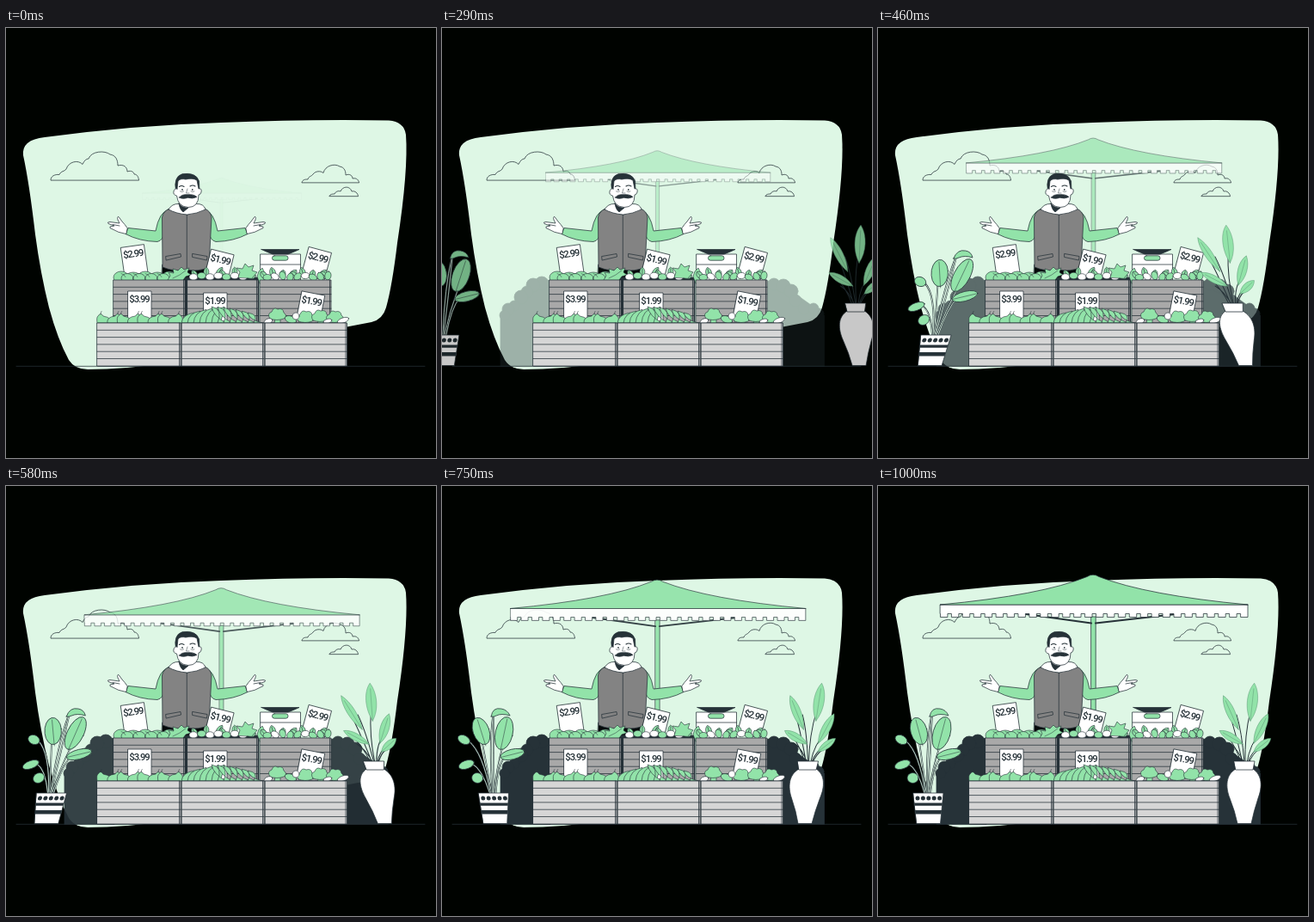
Animation of 500x500 px, one loop 1.04 s. Source, as an HTML page:

```html
<!DOCTYPE html>
<html lang="en">
<head>
<meta charset="utf-8">
<title>Market stall</title>
<style>
  html, body { margin: 0; width: 100%; height: 100%; overflow: hidden; background: #000300; }
  svg { display: block; width: 100vw; height: 100vh; }
  text { font: 500 11.3px Roboto, "Liberation Sans", sans-serif; letter-spacing: -1.1px; fill: #263238; stroke: none; }
</style>
</head>
<body>
<svg id="stage" viewBox="0 0 500 500"></svg>
<script>
const INK = '#263238', GREEN = '#92e3a9', MINT = '#def7e5', WHITE = '#fff';

const path = (d, fill = 'none', extra = '') => `<path d="${d}" fill="${fill}" ${extra}/>`;
const rect = (x, y, w, h, fill, extra = '') =>
  `<rect x="${x}" y="${y}" width="${w}" height="${h}" fill="${fill}" ${extra}/>`;
const oval = (x, y, rx, ry, turn = 0, fill = GREEN, extra = '') =>
  `<ellipse cx="${x}" cy="${y}" rx="${rx}" ry="${ry}" fill="${fill}" transform="rotate(${turn} ${x} ${y})" ${extra}/>`;
const group = (body, extra = '') => `<g ${extra}>${body}</g>`;
const range = (n, make) => Array.from({ length: n }, (_, i) => make(i)).join('');
const NO_LINE = 'stroke="none"', THIN = 'stroke-width=".5"';

// Pointed leaf with a midrib, growing from (x, y)
const leaf = (x, y, len, wide, turn) => group(
  path(`M0 0C${-wide} ${-len * .3} ${-wide} ${-len * .75} 0 ${-len}C${wide} ${-len * .75} ${wide} ${-len * .3} 0 0Z`, GREEN) +
  path(`M0 0V${-len * .85}`), `transform="translate(${x} ${y}) rotate(${turn})"`);

const sign = (x, y, turn, price, h = 33) => group(
  rect(-13.5, 0, 27, h, WHITE) + `<text x="-.5" y="13" text-anchor="middle">${price}</text>`,
  `transform="translate(${x} ${y}) rotate(${turn})"`);

const crate = (x, y, w, fill) =>
  rect(x, y, w, 50, fill) +
  range(5, i => path(`M${x} ${y + 8.3 * (i + 1)}h${w}`)) +
  path(`M${x + w - 1.5} ${y}v50`);

function scenery() {
  const blob = path('M20 148Q18 130 45 127Q150 113 250 110Q350 106 445 107.5Q463 109 465 124Q468 165 455 250' +
    'Q449 300 442 325Q438 339 425 342L300 366Q230 380 180 390Q140 397 95 397Q80 397 73 386Q60 362 50 325' +
    'Q40 285 34 240Q27 180 20 148Z', MINT, NO_LINE);
  const clouds = path('M52 176.7C52 172 57 170 62 170.5C64 166 68 167 70 164C73 155 84 153 89 158.5Q92 152 96 152' +
    'C99 143 115 142 121 147C128 148 130 154 130 160C137 158 141 162 141 167C146 165 149 168 149 170C153 170 154 174 154.5 176.7Z') +
    path('M344 179.5C345 176 348 176 351 176C352 172 355 173 357 170C360 166 366 166 369 168.5C371 160 382 157 388 161' +
      'C394 162 395 167 395 171C400 169 403 172 403 175C408 174 410 177 410.5 179.5Z') +
    path('M376 195.3C377 193 380 193 382 193C383 190 387 189 389 190C391 184 400 183 402 190C406 189 409 192 409.5 195.3Z');
  return blob + path('M12 393.3H487') + clouds;
}

function bush() {
  const puffs = [[116, 297, 8], [106, 299, 8], [99, 307, 7], [92, 313, 8], [84, 323, 6], [77, 327, 7], [73, 334, 6],
    [386, 298, 7], [397, 300, 8], [406, 306, 8], [411, 317, 7], [421, 326, 7], [432, 326, 6], [438, 332, 6]];
  return path('M68 393V334L80 324L92 309L106 296L126 293V393Z', INK) +
    path('M376 393V294L400 296L412 310L436 327L444.5 334V393Z', INK) +
    puffs.map(([x, y, r]) => oval(x, y, r, r, 0, INK)).join('');
}

function umbrella() {
  const step = 12.93;
  let hem = 'M72.5 138H430V152';
  for (let i = 27; i >= 0; i--) {
    const x = 72.5 + i * step;
    hem += `H${x + 8.4}V152.5H${x}V148.5H${x - (i ? step - 8.4 : 0)}`;
  }
  return rect(248, 152, 5.2, 241, GREEN) +
    path('M172 149L248 159.5M253 159.5L346 149', 'none', 'stroke-width="2"') +
    path(hem + 'Z', WHITE) +
    path('M72.5 138Q190 127 243 105.5Q250 101 257 105.5Q312 127 430 138Z', GREEN);
}

function arm() {
  return path('M189 211Q178 214 174 236L142 232.5L139 239.5Q155 248 176 248.5Q183 247 184 237Z', GREEN) +
    path('M141 232.5Q138 228 135 225L131 219.5Q129 219 130 223L132 227L121 225.5Q117 225.5 119 227.5L126 230' +
      'L121 231Q120 233 123 233.5Q130 238 139.5 239.5Z', WHITE) + path('M124 228.5L132 230');
}

function seller() {
  const head = path('M197.5 189Q194.5 173 205 169.7Q221 167.5 224.5 178L225 189Z', INK) +
    path('M199 187L200 178Q203 174.5 209 176Q217 174 222 177L224 187Q228 186 227 191Q226 194 224 194' +
      'Q224 208.5 212 208.5Q200 208 198.5 195Q194 194 195 190Q196 186 199 187Z', WHITE) +
    path('M201.5 184.5Q204 182.5 207 184.5M214 184Q217 182 220 184', 'none', 'stroke-width="1.1"') +
    oval(205, 188, .8, .9, 0, INK, NO_LINE) + oval(216.8, 188, .8, .9, 0, INK, NO_LINE) +
    path('M202.5 190q2 1.2 4 0M215 190q2 1.2 4 0', 'none', THIN) +
    path('M211 187L209.5 192H213', 'none', THIN) +
    path('M201.5 197Q205 193 211 193.8Q218 193 222 196.5Q217 199 211.5 197.3Q205 199.5 201.5 197Z', INK);
  return path('M182 275H236V293H181Z', '#060a0a') + arm() + group(arm(), 'transform="matrix(-1 0 0 1 420 0)"') +
    path('M190 210Q183 213 181.5 220L182 278Q196 284 210 281Q224 284 236 278L239 220Q238 213 231 210L211 217Z', '#838383') +
    path('M210.3 216V282') +
    path('M186 265.5L203 262.5L203.5 266L186.5 270ZM217 262.5L234 265.5L233.5 270L217 266.5Z') +
    path('M189 211Q193 204 201 204.5H221Q230 204 232 211Q222 216 210.5 217Q198 216 189 211Z', WHITE) +
    path('M201 204Q204 209 212 209L206 214Q202 211 201 204Z', INK) + head;
}

function scales() {
  return rect(296, 263, 46.5, 30, WHITE) + path('M296 275H342.5') +
    rect(309.5, 264.8, 18.5, 5.4, GREEN, 'rx="2.6"') +
    path('M297 257.5H341Q333 261 328 263H310Q305 261 297 257.5Z', INK);
}

function topProduce() {
  const melons = range(5, i => oval(134 + i * 14, 290, 9, 7 - i % 2, 0)) +
    range(4, i => oval(141 + i * 14, 291, 7, 5.5, 0)) +
    range(5, i => path(`M${134 + i * 14} 285.5q4 1 5 4`, 'none', THIN));
  const lettuce = path('M188 293L191 288L189 284L195 285L194 280L200 282L204 278L207 281L213 279L211 284L215 287L209 289L206 293Z', GREEN) +
    path('M194 291Q202 288 209 282', 'none', THIN);
  const turnips = range(6, i => leaf(222 + i * 11, 290, 10 + i % 3 * 2, 4, -35 + i % 3 * 34)) +
    range(8, i => oval(218 + i * 9.6, 289.5 - i % 2 * 1.5, 5, 3.8, 0, i % 3 === 1 ? GREEN : WHITE)) +
    path('M270 290L272 284L268 279L275 280L278 274L282 278L288 276L286 282L292 284L286 291Z', GREEN) +
    path('M295 297L292 289L294 283L298 279L301 285L299 291L302 296Z', GREEN);
  const sprouts = range(9, i => leaf(303 + i * 8.7, 291, 10 + i % 2 * 3, 4.5, -42 + i % 4 * 28)) +
    range(9, i => oval(304 + i * 8.8, 290 - i % 3, 5, 3.6, i * 35, i % 4 === 1 ? WHITE : GREEN));
  return melons + lettuce + turnips + sprouts;
}

function lowProduce() {
  const pears = range(8, i => {
    const x = 114 + i * 11.8, lean = i % 2 ? 4 : -4;
    return path(`M${x - 8} 343Q${x - 9} 336 ${x - 3 + lean} 335Q${x + lean} 330 ${x + 3 + lean} 335Q${x + 10} 337 ${x + 8} 343Z`, GREEN) +
      path(`M${x + lean} 332.5q0-2 1-3`);
  });
  const bananas = range(13, i => {
    const x = 208 + i * 7, lift = 9 + 9 * Math.sin((i + 1) / 14 * Math.PI), dir = i < 6 ? 1 : -1;
    return path(`M${x - 4} 343Q${x - dir * 3} ${343 - lift * .9} ${x + dir * 11} ${342 - lift}` +
      `Q${x + dir * 9} ${346 - lift * .6} ${x + 6} 343Z`, GREEN);
  });
  const floret = (x, y) => path(`M${x - 3} ${y + 12}L${x - 2} ${y + 3}H${x + 4}L${x + 4} ${y + 12}Z`, GREEN) +
    path(`M${x - 8} ${y + 5}Q${x - 12} ${y - 1} ${x - 6} ${y - 3}Q${x - 4} ${y - 9} ${x + 1} ${y - 6}` +
      `Q${x + 7} ${y - 8} ${x + 8} ${y - 2}Q${x + 13} ${y + 2} ${x + 8} ${y + 5}Q${x} ${y + 8} ${x - 8} ${y + 5}Z`, GREEN);
  const broccoli = floret(315, 333) + floret(348, 336) + floret(365, 335) + floret(382, 336) +
    oval(305, 341, 5, 3, -20, WHITE) + oval(331, 339, 7, 4, 20) + oval(337, 335, 4, 4, 0, WHITE) +
    oval(374, 341, 5, 2.6, -15, WHITE) + oval(392, 340, 7, 3, -20, WHITE);
  return pears + bananas + broccoli;
}

function stall() {
  const dark = '#a9a9a9', light = '#d6d6d6';
  return sign(147, 253.5, -8, '$2.99') + sign(252, 260.5, 14, '$1.99', 30) + scales() + sign(365.5, 258, 15, '$2.99') +
    rect(208, 290, 86, 53, INK) + group(topProduce(), 'stroke-width=".6"') +
    crate(125, 293, 83, dark) + crate(211, 293, 82, dark) + crate(295.5, 293, 82.5, dark) +
    sign(155.5, 306, 0, '$3.99') + sign(243.5, 308, 0, '$1.99') + sign(357.5, 308.5, 11, '$1.99', 30) +
    group(lowProduce(), 'stroke-width=".6"') + rect(107, 343, 289, 50, '#8d9193') +
    crate(106, 343, 97, light) + crate(204.5, 343, 95.5, light) + crate(301.5, 343, 95, light);
}

function pottedPlant() {
  const stems = ['M56 357Q52 325 48 298', 'M59 357Q63 330 72 302', 'M57 357Q56 300 62 268', 'M61 357Q65 325 74 314',
    'M55 357Q48 310 33 297', 'M54 357Q46 328 35 323', 'M58 357Q61 310 63 264'];
  return stems.map(d => path(d, 'none', 'stroke-width="1.8"') + path(d, 'none', `style="stroke:${MINT}" stroke-width=".8"`)).join('') +
    path('M60 268Q62 257 72 259Q79 260 82 267Q72 264 66 267Q63 269 60 268Z', GREEN) +
    oval(47.5, 285, 9.5, 16, -16) + path('M44 272L52 302', 'none', THIN) +
    oval(74, 287.5, 10, 19.5, 16) + path('M78.5 271L69 307', 'none', THIN) +
    oval(82.5, 312, 14.5, 5.8, -14) + path('M69 315.5L95 309', 'none', THIN) +
    oval(27, 295, 7.5, 5, 28) + oval(28.5, 324, 9.5, 4.8, -20) + oval(40.5, 339.5, 6.5, 6, 0) +
    path('M41 357H76L72.5 392.5H45Z', WHITE) +
    path('M42.2 368.5H74.8L74.5 371.8H42.5ZM43 377H74L73.5 381.5H43.7Z', INK, NO_LINE) +
    range(5, i => oval(46 + i * 6.4, 363, 2.5, 2.5, 0, INK, NO_LINE));
}

function vase() {
  const leaves = leaf(433, 273, 44, 8, 6) + leaf(419, 283, 43, 6.5, -24) + leaf(424, 300, 31, 6, -60) +
    leaf(437, 299, 38, 6.5, 26) + leaf(437, 309, 25, 5.5, 52);
  return path('M424 322Q418 295 411 272M427 322Q426 290 433 262M429 322Q432 300 446 285M422 322Q417 303 404 288' +
    'M430 322Q434 308 448 300M426 322Q423 285 417 266M425 322Q419 306 410 300M431 322Q436 311 442 307', 'none', 'stroke-width="1"') +
    group(leaves, 'stroke="#5f9a78" stroke-width=".5"') +
    path('M416 329C404 336 404 350 409 363Q415 378 418 392.5H434Q437 378 442 363C447 350 447 336 436 329Z', WHITE) +
    path('M414 320H438L436 330H416Z', WHITE);
}

const part = (id, body) => group(body, `id="${id}"`);
document.getElementById('stage').innerHTML = group(
  scenery() + part('bush', bush()) + part('umbrella', umbrella()) + seller() + stall() +
  part('pot', pottedPlant()) + part('vase', vase()),
  `stroke="${INK}" stroke-width=".75" stroke-linejoin="round" stroke-linecap="round"`);

function bezier(x1, y1, x2, y2) {
  const at = (a, b, s) => 3 * (1 - s) * (1 - s) * s * a + 3 * (1 - s) * s * s * b + s * s * s;
  return x => {
    if (x <= 0) return 0;
    if (x >= 1) return 1;
    let lo = 0, hi = 1;
    for (let i = 0; i < 30; i++) {
      const mid = (lo + hi) / 2;
      if (at(x1, x2, mid) < x) lo = mid; else hi = mid;
    }
    return at(y1, y2, lo);
  };
}
const easeOut = bezier(0, 0, .58, 1), spring = bezier(.36, -.01, .5, 1.38);

// Lean-in steps: time, horizontal shift, slant
const LEAN = [[0, -250, 20], [.6, 0, -10], [.8, 0, 2], [1, 0, 0]]
  .map(([at, shift, deg]) => [at, shift, Math.tan(deg * Math.PI / 180)]);

function lean(u) {
  const i = u < .6 ? 0 : u < .8 ? 1 : 2;
  const [t0, x0, k0] = LEAN[i], [t1, x1, k1] = LEAN[i + 1];
  const p = spring((u - t0) / (t1 - t0));
  return { x: x0 + (x1 - x0) * p, k: k0 + (k1 - k0) * p, alpha: i ? 1 : Math.min(1, Math.max(0, p)) };
}

const LOOP = 1040, FPS = 24;
const tickStart = k => Math.round(k * 100 / FPS) * 10;
const byId = id => document.getElementById(id);
const parts = { bush: byId('bush'), umbrella: byId('umbrella'), pot: byId('pot'), vase: byId('vase') };

function place(el, transform, alpha) {
  el.setAttribute('transform', transform);
  el.setAttribute('opacity', alpha);
}

function draw(ms) {
  let k = 0;
  while (k < FPS && tickStart(k + 1) <= ms) k++;
  const u = Math.min(1, (k + .5) / FPS);

  parts.bush.setAttribute('opacity', Math.min(1, Math.max(0, spring(u))));
  const e = easeOut(u), s = .5 + e / 2;
  place(parts.umbrella, `translate(251 250) scale(${s}) translate(-251 -250)`, e);
  const m = lean(u);
  place(parts.pot, `matrix(1 0 ${m.k} 1 ${m.x - m.k * 326} 0)`, m.alpha);
  place(parts.vase, `matrix(1 0 ${-m.k} 1 ${-m.x + m.k * 311} 0)`, m.alpha);
}

const start = performance.now();
function tick() {
  draw((performance.now() - start) % LOOP);
  requestAnimationFrame(tick);
}
tick();
</script>
</body>
</html>
```
